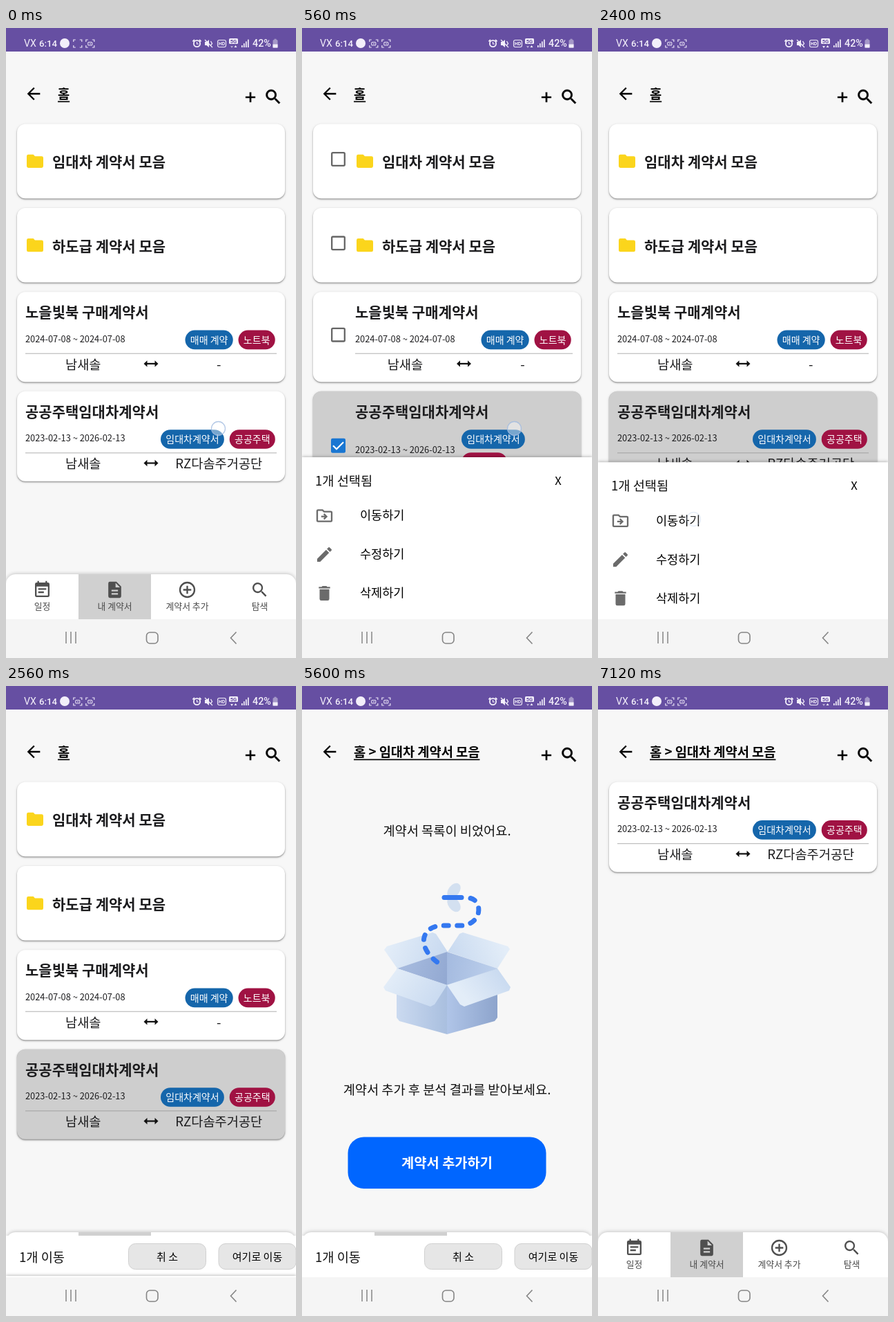
An HTML page with a canvas for the animation above (7600 ms loop, 420 px wide and 910 px high).

```html
<!DOCTYPE html>
<html lang="ko">
<head>
<meta charset="utf-8">
<style>
html, body { margin: 0; width: 100%; height: 100%; overflow: hidden; background: #f7f7f7; }
canvas { display: block; width: 420px; height: 910px; }
</style>
</head>
<body>
<canvas id="stage" width="420" height="910"></canvas>
<script>
const ctx = document.getElementById('stage').getContext('2d');
const LOOP = 7600, STEP = 80;
const SANS = '"Noto Sans CJK KR", "Noto Sans CJK", sans-serif';
const BODY = 18.67;
const PERSON = '남새솔', AGENCY = 'RZ다솜주거공단', FOLDER_NAME = '임대차 계약서 모음';
const BLUE = '#1566ab', RED = '#a01243', INK = '#1c1c1e';

const ICONS = {
  calendar: 'M17 10H7v2h10zM19 3h-1V1h-2v2H8V1H6v2H5a2 2 0 0 0-2 2v14a2 2 0 0 0 2 2h14a2 2 0 0 0 2-2V5a2 2 0 0 0-2-2zm0 16H5V8h14zM14 14H7v2h7z',
  doc: 'M14 2H6a2 2 0 0 0-2 2v16a2 2 0 0 0 2 2h12a2 2 0 0 0 2-2V8zM16 18H8v-2h8zm0-4H8v-2h8zM13 9V3.5L18.5 9z',
  addCircle: 'M13 7h-2v4H7v2h4v4h2v-4h4v-2h-4zM12 2a10 10 0 1 0 0 20a10 10 0 1 0 0-20zm0 18a8 8 0 1 1 0-16a8 8 0 1 1 0 16z',
  search: 'M15.5 14h-.8l-.3-.3A6.5 6.5 0 1 0 13.7 14.4l.3.3v.8l5 5 1.5-1.5zM9.5 14a4.5 4.5 0 1 1 0-9a4.5 4.5 0 1 1 0 9z',
  folder: 'M10 4H4a2 2 0 0 0-2 2v12a2 2 0 0 0 2 2h16a2 2 0 0 0 2-2V8a2 2 0 0 0-2-2h-8z',
  move: 'M20 6h-8l-2-2H4a2 2 0 0 0-2 2v12a2 2 0 0 0 2 2h16a2 2 0 0 0 2-2V8a2 2 0 0 0-2-2zm0 12H4V6h5.2l2 2H20zM12.2 12H8v2h4.2l-1.6 1.6L12 17l4-4-4-4-1.4 1.4z',
  edit: 'M3 17.25V21h3.75L17.8 9.95 14.05 6.2zM20.7 7a1 1 0 0 0 0-1.4l-2.3-2.3a1 1 0 0 0-1.4 0l-1.9 1.8 3.75 3.75z',
  trash: 'M6 19a2 2 0 0 0 2 2h8a2 2 0 0 0 2-2V7H6zM19 4h-3.5l-1-1h-5l-1 1H5v2h14z',
  back: 'M20 11H7.8l5.6-5.6L12 4l-8 8 8 8 1.4-1.4L7.8 13H20z',
  plus: 'M19 13.3h-5.7V19h-2.6v-5.7H5v-2.6h5.7V5h2.6v5.7H19z'
};
for (const key in ICONS) ICONS[key] = new Path2D(ICONS[key]);

function icon(name, x, y, color, scale = 1.167, outline = 0) {
  ctx.save();
  ctx.translate(x, y);
  ctx.scale(scale, scale);
  ctx.translate(-12, -12);
  ctx.fillStyle = ctx.strokeStyle = color;
  ctx.fill(ICONS[name], 'evenodd');
  ctx.lineWidth = outline;
  if (outline) ctx.stroke(ICONS[name]);
  ctx.restore();
}

// y is the optical middle of the line
function text(str, x, y, size, { weight = 400, color = '#111', align = 'left', family = SANS } = {}) {
  ctx.font = `${weight} ${size}px ${family}`;
  ctx.textAlign = align;
  ctx.fillStyle = color;
  ctx.fillText(str, x, y + size * 0.37);
  return ctx.measureText(str).width;
}

function rect(x, y, w, h, color) {
  ctx.fillStyle = color;
  ctx.fillRect(x, y, w, h);
}

function round(x, y, w, h, r, fill, stroke, lineWidth = 1) {
  ctx.beginPath();
  ctx.roundRect(x, y, w, h, r);
  if (fill) { ctx.fillStyle = fill; ctx.fill(); }
  if (stroke) { ctx.strokeStyle = stroke; ctx.lineWidth = lineWidth; ctx.stroke(); }
}

function poly(points, fill) {
  ctx.beginPath();
  points.forEach(([x, y]) => ctx.lineTo(x, y));
  ctx.closePath();
  ctx.fillStyle = fill;
  ctx.fill();
}

function line(points, color, width = 1) {
  ctx.beginPath();
  points.forEach(([x, y]) => ctx.lineTo(x, y));
  ctx.strokeStyle = color;
  ctx.lineWidth = width;
  ctx.stroke();
}

function circle(x, y, r, fill, stroke, width = 1) {
  ctx.beginPath();
  ctx.arc(x, y, r, 0, Math.PI * 2);
  if (fill) { ctx.fillStyle = fill; ctx.fill(); }
  if (stroke) { ctx.strokeStyle = stroke; ctx.lineWidth = width; ctx.stroke(); }
}

function shadowed(alpha, blur, dy, draw) {
  ctx.save();
  ctx.shadowColor = `rgba(0,0,0,${alpha})`;
  ctx.shadowBlur = blur;
  ctx.shadowOffsetY = dy;
  draw();
  ctx.restore();
}

function gradient(x0, y0, x1, y1, from, to) {
  const g = ctx.createLinearGradient(x0, y0, x1, y1);
  g.addColorStop(0, from);
  g.addColorStop(1, to);
  return g;
}

function captureIcon(x, dot) {
  const color = '#e9e3f5';
  for (const sx of [-1, 1]) for (const sy of [-1, 1])
    line([[x + sx * 3, 22.5 + sy * 5.5], [x + sx * 6, 22.5 + sy * 5.5], [x + sx * 6, 22.5 + sy * 2.5]], color, 1.2);
  if (!dot) return;
  round(x - 3, 20.5, 6, 4.5, 1, null, color, 1.1);
  rect(x - 0.5, 22, 1.5, 1.5, color);
}

function statusBar(t) {
  const white = '#f3effa', family = 'Roboto, sans-serif';
  rect(0, 0, 420, 34, '#664fa2');
  text('VX', 26, 22, 14.2, { color: white, family });
  text('6:14', 48, 22, 13.2, { color: white, family, weight: 500 });
  circle(85, 22, 7, white);
  const blinks = [[320, 800], [1120, 1840], [2320, 2800], [3120, 3840], [4080, 4800], [5040, 5760], [6320, 6800], [7120, LOOP]];
  captureIcon(103.8, blinks.some(([on, off]) => t >= on && t < off));
  captureIcon(121.8, true);

  circle(276.5, 22.5, 4.6, null, white, 1.8);
  line([[276.5, 20], [276.5, 23], [279, 23]], white, 1.2);
  line([[270.5, 19.5], [273, 17]], white, 1.8);
  line([[280, 17], [282.5, 19.5]], white, 1.8);
  poly([[288, 20], [290.5, 20], [294, 17], [294, 28], [290.5, 25], [288, 25]], white);
  line([[288, 17], [299, 28]], white, 1.3);
  line([[296.5, 19], [298.5, 22.5], [296.5, 25]], white, 1.3);
  round(306.5, 17.5, 12, 10, 2.5, null, white, 1.1);
  text('HD', 312.5, 22.5, 7, { color: white, align: 'center', weight: 700, family });
  round(323, 15, 13, 8, 1.5, white);
  text('5G', 329.5, 19, 7.5, { color: '#664fa2', align: 'center', weight: 700, family });
  const busy = t >= 1520 && t < 5600;
  poly([[325, 26], [329, 26], [327, 29]], busy ? white : '#b9add5');
  poly([[330.5, 28], [334.5, 28], [332.5, 25]], white);
  for (let i = 0; i < 4; i++) rect(341 + i * 3, 25 - i * 2.8, 1.7, 3 + i * 2.8, white);
  text('42%', 357, 22.2, 14.3, { color: white, family, weight: 500 });
  round(386.5, 17, 7, 11.5, 1.5, '#a598c8');
  rect(388.5, 15.7, 3, 1.5, '#a598c8');
  rect(386.5, 23.5, 7, 5, white);
}

function header(path) {
  icon('back', 40, 95, '#000');
  const width = text(path, 75, 94.6, BODY, { weight: 700, color: '#000' });
  rect(75, 105.5, width, 1.7, '#000');
  icon('plus', 354, 100, '#000', 1.02);
  icon('search', 387, 99.5, '#000', 1.167, 0.5);
}

function card(y, h, selected) {
  const draw = () => round(16, y, 388, h, 12, selected ? '#cecece' : '#fff');
  shadowed(0.12, 4, 1, draw);
  shadowed(0.38, 2, 1.2, draw);
}

function checkbox(y, checked) {
  if (!checked) return round(43.2, y - 9.3, 18.6, 18.6, 1.5, null, '#666', 2.3);
  round(42, y - 10.5, 21, 21, 2.3, '#1976d2');
  line([[45, y], [50, y + 5], [60, y - 5]], '#fff', 2.2);
}

function folderCard(y, name, picking) {
  const shift = picking ? 49 : 0;
  card(y, 107.5);
  if (picking) checkbox(y + 50.8);
  icon('folder', 42 + shift, y + 53.7, '#fbd51c', 1.2);
  text(name, 67 + shift, y + 55, 21, { weight: 700, color: INK });
}

function pill(label, x, y, color) {
  ctx.font = `400 14px ${SANS}`;
  const w = ctx.measureText(label).width + 14.6;
  round(x, y, w, 27.6, 13.8, color);
  text(label, x + 7.3, y + 14, 14, { color: '#fff' });
}

function contractCard(y, doc, picking, selected) {
  const left = picking ? 77 : 28, width = 392 - left;
  const wrap = picking && selected ? 33 : 0;
  card(y, 130 + wrap, selected);
  if (picking) checkbox(y + (130 + wrap) / 2 - 3, selected);
  text(doc.title, left, y + 29.2, 21, { weight: 700, color: INK });
  text(doc.dates, left, y + 67.8 + wrap / 2, 12.83, { color: INK });
  pill(doc.tags[0], wrap ? 231 : doc.tagX[0], y + 55.4, BLUE);
  pill(doc.tags[1], wrap ? 231 : doc.tagX[1], y + 55.4 + wrap, RED);
  rect(left, y + 88.5 + wrap, width, 1, selected ? '#a2a2a2' : '#b0b0b0');
  const row = y + 104.5 + wrap, mid = left + width / 2;
  text(PERSON, left + width * 0.23, row, BODY, { align: 'center', color: INK });
  text(doc.party, left + width * 0.77, row, BODY, { align: 'center', color: INK });
  const ay = row - 0.8;
  line([[mid - 7, ay], [mid + 7, ay]], '#111', 2.2);
  for (const s of [-1, 1]) poly([[mid + s * 10.5, ay], [mid + s * 5.5, ay - 4.7], [mid + s * 5.5, ay + 4.7]], '#111');
}

const LAPTOP = { title: '노을빛북 구매계약서', dates: '2024-07-08 ~ 2024-07-08', tags: ['매매 계약', '노트북'], tagX: [259.5, 336.5], party: '-' };
const HOUSING = { title: '공공주택임대차계약서', dates: '2023-02-13 ~ 2026-02-13', tags: ['임대차계약서', '공공주택'], tagX: [224, 323.7], party: AGENCY };

function homeList(picking, selected) {
  folderCard(138.7, FOLDER_NAME, picking);
  folderCard(260, '하도급 계약서 모음', picking);
  contractCard(381.2, LAPTOP, picking, false);
  contractCard(524.8, HOUSING, picking, selected);
}

function emptyBox() {
  const flap = (points, x0, y0, x1, y1) => poly(points, gradient(x0, y0, x1, y1, '#e3edf8', '#c9daf0'));
  flap([[123, 376], [189, 356], [194, 358], [211, 384], [138, 408], [119, 381]], 125, 370, 200, 400);
  flap([[228, 358], [233, 356], [298, 376], [301, 380], [283, 408], [211, 384]], 290, 370, 220, 400);
  poly([[138, 408], [210, 384], [210, 432]], gradient(138, 400, 210, 420, '#a9bde0', '#93a9d2'));
  poly([[210, 384], [283, 408], [210, 432]], gradient(210, 400, 283, 410, '#a5bbe0', '#bdd0ec'));
  poly([[137, 408], [210, 432], [210, 503], [141, 484], [137, 479]], gradient(137, 0, 210, 0, '#cbdaf0', '#a9bfdf'));
  poly([[210, 432], [283, 408], [283, 479], [279, 484], [210, 503]], gradient(210, 0, 283, 0, '#b0c5e8', '#8da4cc'));
  flap([[138, 408], [210, 432], [192, 460], [186, 463], [121, 440], [118, 435]], 130, 415, 195, 462);
  flap([[283, 408], [302, 435], [300, 440], [235, 463], [229, 460], [210, 432]], 240, 455, 290, 415);

  ctx.fillStyle = '#d3e0f0';
  for (const s of [-1, 1]) {
    ctx.beginPath();
    ctx.ellipse(220, 305.5 + s * 10, 8, 12, -s * 0.65, 0, Math.PI * 2);
    ctx.fill();
  }
  ctx.save();
  ctx.lineCap = 'round';
  line([[206, 305.5], [231, 305.5]], '#3478f0', 7);
  ctx.setLineDash([7, 12.5]);
  ctx.stroke(new Path2D('M244 306.5C262 311 261 344 231 346H203C172 347 166 377 196 399'));
  ctx.restore();
}

function emptyPage() {
  text('계약서 목록이 비었어요.', 210, 209, BODY, { align: 'center' });
  emptyBox();
  text('계약서 추가 후 분석 결과를 받아보세요.', 210, 583, BODY, { align: 'center' });
  round(66.5, 651.5, 287, 74.5, 23, '#0066ff');
  text('계약서 추가하기', 210, 689, 19.8, { weight: 700, align: 'center', color: '#fff' });
}

function tabBar() {
  shadowed(0.2, 5, -1, () => round(0, 789, 420, 66, [14, 14, 0, 0], '#fff'));
  rect(105, 789, 105, 66, '#d0d0d0');
  [['calendar', '일정'], ['doc', '내 계약서'], ['addCircle', '계약서 추가'], ['search', '탐색']].forEach(([name, label], i) => {
    const x = 52.5 + i * 105;
    icon(name, x, 811.5, '#4f4f4f');
    text(label, x, 835, 12.83, { align: 'center', color: '#4a4a4a' });
  });
}

function moveBar() {
  rect(0, 794, 420, 60, '#fff');
  text('1개 이동', 19, 825, BODY);
  [[177.5, '취 소'], [308, '여기로 이동']].forEach(([x, label]) => {
    round(x, 805.5, 112, 37, 10, '#e6e6e6', '#d0d0d0');
    text(label, x + 56, 824, 15, { align: 'center', color: '#000' });
  });
}

function actionSheet(y) {
  shadowed(0.25, 4, -1, () => rect(0, y, 420, 910 - y, '#fff'));
  text('1개 선택됨', 19, y + 34, BODY);
  text('X', 371, y + 33.5, 16.5, { align: 'center', color: '#000' });
  [['move', '이동하기'], ['edit', '수정하기'], ['trash', '삭제하기']].forEach(([name, label], i) => {
    const row = y + 84 + i * 56;
    icon(name, 32.5, row + 0.5, '#6b6b6b');
    text(label, 84, row, 17.5, { color: '#000' });
  });
}

function systemNav() {
  rect(0, 854, 420, 56, '#f5f5f5');
  const color = '#858585';
  for (const x of [87, 94, 101]) line([[x, 872], [x, 889]], color, 1.5);
  round(203.5, 873, 16.5, 16, 5, null, color, 1.6);
  line([[333.5, 872.5], [325.5, 881], [333.5, 889.5]], color, 1.6);
}

const clamp = v => Math.max(0, Math.min(1, v));

function sheetY(t) {
  if (t < 2000) return 854 - 234 * (1 - Math.pow(1 - clamp((t - 290) / 225), 3));
  const p = clamp((t - 2380) / 190);
  return 620 + 234 * p * p * (3 - 2 * p);
}

// x, y, appears, full, starts fading, gone
const TOUCHES = [
  [307.5, 578.5, -80, -80, 560, 800],
  [138.5, 709.5, 2080, 2160, 2240, 2480],
  [232, 207, 4560, 4640, 4640, 4800],
  [375, 826, 6080, 6080, 6240, 6560]
];

function touches(t) {
  for (const [x, y, on, full, fade, gone] of TOUCHES) {
    ctx.globalAlpha = clamp(Math.min((t - on + STEP) / (full - on + STEP), (gone - t) / (gone - fade)));
    circle(x, y, 10, 'rgba(255,255,255,.42)', 'rgba(160,186,224,.8)', 1.3);
  }
  ctx.globalAlpha = 1;
}

function draw(t) {
  const picking = t >= 320 && t < 2400;
  const moving = t >= 2400 && t < 6320;
  const sheetOpen = t >= 320 && t < 2640;
  rect(0, 0, 420, 910, '#f7f7f7');
  header(t < 4640 ? '홈' : '홈 > ' + FOLDER_NAME);
  if (t < 4720) homeList(picking, picking || moving);
  else if (t < 6400) emptyPage();
  else contractCard(138.7, HOUSING, false, false);
  tabBar();
  if (moving) moveBar();
  if (sheetOpen) actionSheet(sheetY(t));
  systemNav();
  statusBar(t);
  touches(t);
}

const start = performance.now();
function tick() {
  const elapsed = (performance.now() - start) % LOOP;
  draw(Math.floor(elapsed / STEP) * STEP);
  requestAnimationFrame(tick);
}
tick();
</script>
</body>
</html>
```
